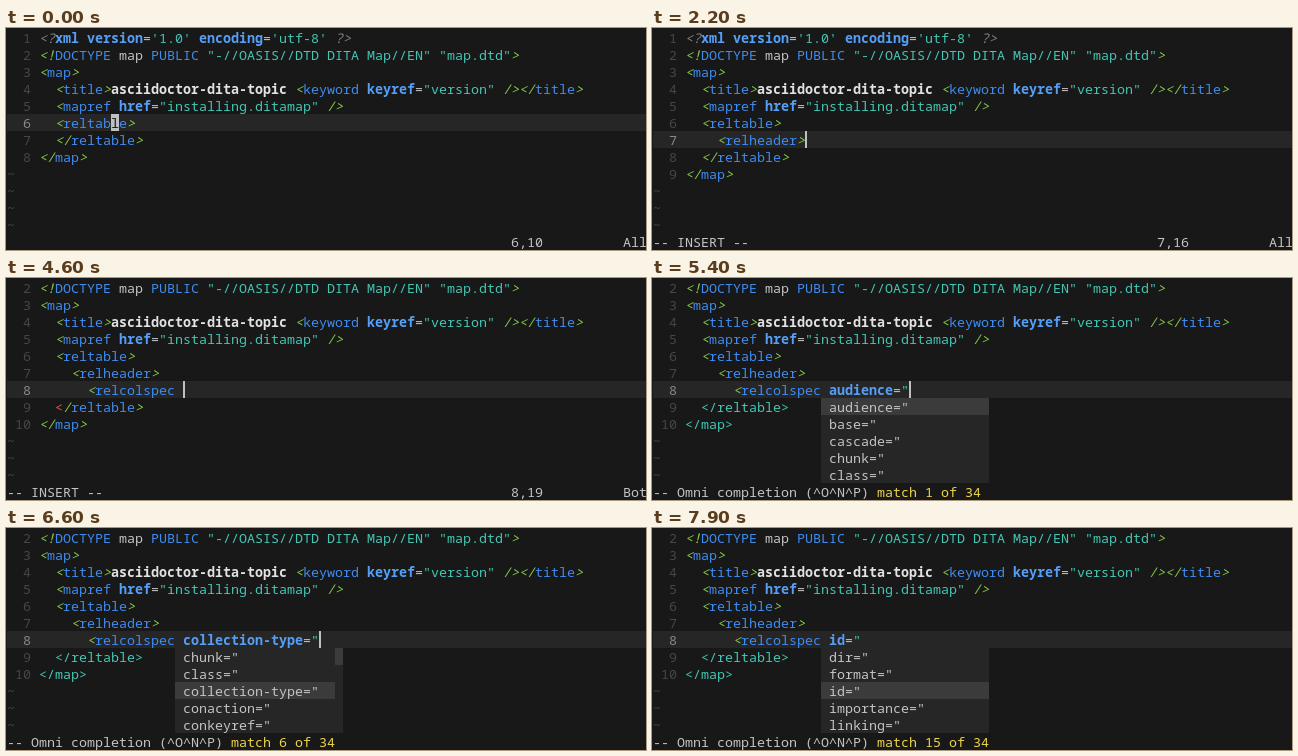
Write an HTML page that moves like this. It is 640 px wide and 222 px high and loops after 8000 ms.

```html
<!DOCTYPE html>
<html lang="en">
<head>
<meta charset="utf-8">
<title>Editor completion</title>
<style>
html, body { margin: 0; width: 100%; height: 100%; overflow: hidden; background: #181818; }
svg { display: block; width: 640px; height: 222px; }
text { font: 13.3333px "Noto Sans Mono", "DejaVu Sans Mono", monospace; white-space: pre; }
.n { fill: #c4c4c4; }
.g { fill: #87c84a; font-style: italic; }
.b { fill: #3f8cf0; }
.a { fill: #559ff8; font-weight: bold; }
.s { fill: #43c6b4; }
.t { fill: #e2e2e2; font-weight: bold; }
.c { fill: #808080; font-style: italic; }
.r { fill: #f0523f; }
.y { fill: #ecd548; }
.l { fill: #464646; }
.h { fill: #828a8c; }
.k { fill: #181818; }
</style>
</head>
<body>
<svg id="screen" viewBox="0 0 640 222"></svg>
<script>
const CW = 8, RH = 17, BASE = 14, ROWS = 12, LOOP = 8000;
const screen = document.getElementById('screen');

// Each token is one class letter followed by its text.
const head = [
  ['c<?', 'axml version', 'n=', "s'1.0'", 'a encoding', 'n=', "s'utf-8'", 'n ', 'c?>'],
  ['g<!', 'bDOCTYPE', 'n map ', 'bPUBLIC', 'n ', 's"-//OASIS//DTD DITA Map//EN"', 'n ', 's"map.dtd"', 'g>'],
  ['g<', 'bmap', 'g>'],
  ['n  ', 'g<', 'btitle', 'g>', 'tasciidoctor-dita-topic', 'n ', 'g<', 'bkeyword', 'n ',
    'akeyref', 'n=', 's"version"', 'n ', 'g/></', 'btitle', 'g>'],
  ['n  ', 'g<', 'bmapref', 'n ', 'ahref', 'n=', 's"installing.ditamap"', 'n ', 'g/>'],
  ['n  ', 'g<', 'breltable', 'g>']
];

const elements = ['relheader', 'relrow', 'title', 'topicmeta'];
const columns = ['relcolspec'];
const attrs = ('audience base cascade chunk class collection-type conaction conkeyref conref ' +
  'conrefend copy-to deliveryTarget dir format id importance linking locktitle').split(' ').map(a => a + '="');
const ATTR_TOTAL = 34;

const INSERT = '-- INSERT --', OMNI = '-- Omni completion (^O^N^P)';

// Completion steps: time and selected attribute.
const picks = [[5400, 1], [6100, 2], [6200, 3], [6300, 4], [6400, 5], [6600, 6], [6700, 7], [6900, 8],
  [7000, 9], [7100, 10], [7400, 11], [7500, 12], [7600, 13], [7800, 14], [7900, 15]];

const states = [
  { t: 0, line: 6, msg: '', ruler: true },
  { t: 200, line: 7, pad: 2, text: '', msg: INSERT, ruler: true },
  { t: 500, line: 7, pad: 4, text: '', msg: INSERT, ruler: true },
  { t: 900, line: 7, pad: 4, text: '<', msg: INSERT, ruler: true },
  { t: 1200, line: 7, pad: 4, text: '<', msg: OMNI },
  { t: 1400, line: 7, pad: 4, text: '<relheader', msg: OMNI,
    menu: { items: elements, sel: 1, total: 4, col: 8, width: 16 } },
  { t: 2100, line: 7, pad: 4, text: '<relheader>', msg: '' },
  { t: 2200, line: 7, pad: 4, text: '<relheader>', msg: INSERT, ruler: true },
  { t: 2500, line: 8, pad: 4, text: '', msg: INSERT, ruler: true },
  { t: 2900, line: 8, pad: 5, text: '', msg: INSERT, ruler: true },
  { t: 3000, line: 8, pad: 6, text: '', msg: INSERT, ruler: true },
  { t: 3200, line: 8, pad: 6, text: '<', msg: INSERT, ruler: true },
  { t: 3700, line: 8, pad: 6, text: '<', msg: OMNI },
  { t: 4000, line: 8, pad: 6, text: '<relcolspec', msg: OMNI,
    menu: { items: columns, sel: 1, total: 1, col: 10, width: 16 } },
  { t: 4600, line: 8, pad: 6, text: '<relcolspec ', msg: INSERT, ruler: true },
  { t: 5100, line: 8, pad: 6, text: '<relcolspec ', msg: OMNI },
  ...picks.map(([t, sel]) => ({
    t, line: 8, pad: 6, text: '<relcolspec ' + attrs[sel - 1], msg: OMNI, noCursor: sel === 15,
    menu: { items: attrs, sel, total: ATTR_TOTAL, col: 21, width: 20 }
  }))
];

function add(name, props, text) {
  const el = document.createElementNS('http://www.w3.org/2000/svg', name);
  for (const k in props) el.setAttribute(k, props[k]);
  if (text) el.textContent = text;
  screen.append(el);
}

const px = col => 1 + col * CW;
const py = row => 1 + row * RH;
const box = (x, row, width, fill) => add('rect', { x, y: py(row), width, height: RH, fill });

function put(col, row, cls, str) {
  if (str.trim()) add('text', { x: px(col), y: py(row) + BASE, class: cls }, str);
}

function putLine(col, row, tokens) {
  for (const token of tokens) {
    const str = token.slice(1), lead = str.length - str.trimStart().length;
    put(col + lead, row, token[0], str.trim());
    col += str.length;
  }
}

function typed(pad, text) {
  const out = ['n' + ' '.repeat(pad)];
  if (text === '<') return [...out, 'r<'];
  const m = text.match(/^<(\w+)(>?)( ?)([\w-]*)(=?)("?)$/);
  return m ? [...out, 'g<', 'b' + m[1], 'g' + m[2], 'n' + m[3], 'a' + m[4], 'n' + m[5], 's' + m[6]] : out;
}

function tail(text = '') {
  if (text.includes('"')) return [['n  ', 's</reltable>'], ['s</map>']];
  const open = /^<\w+ ?$/.test(text);
  return [['n  ', open ? 'r<' : 'g<', 'g/', 'breltable', 'g>'], ['g</', 'bmap', 'g>']];
}

function drawMenu({ items, sel, total, col, width }, row) {
  const shown = Math.min(5, total), first = Math.max(0, Math.min(sel - 3, total - shown));
  const scrolls = total > shown, end = px(col + width);
  for (let i = 0; i < shown; i++) {
    const on = first + i === sel - 1;
    box(px(col), row + i, width * CW, on ? '#3b3b3b' : '#262626');
    put(col + 1, row + i, 'n', items[first + i]);
    if (scrolls) box(end, row + i, CW, '#262626');
  }
  if (scrolls) {
    const span = total - shown;
    const thumb = Math.floor((first * (shown - 1) + (span >> 1)) / span);
    box(end, row + thumb, CW, '#3b3b3b');
  }
  put(OMNI.length + 1, ROWS, 'y', total === 1 ? 'The only match' : `match ${sel} of ${total}`);
}

function draw(s) {
  screen.replaceChildren();
  const top = s.line === 8 ? 1 : 0, row = s.line - 1 - top;
  const lines = [...head];
  if (s.line === 8) lines.push(typed(4, '<relheader>'));
  if (s.line > 6) lines.push(typed(s.pad, s.text));
  lines.push(...tail(s.text));

  box(px(0), row, 640, '#262626');
  for (let r = 0; r < ROWS; r++) {
    const line = lines[r + top];
    if (!line) { put(0, r, 'l', '~'); continue; }
    const num = String(r + top + 1);
    put(3 - num.length, r, r === row ? 'h' : 'l', num);
    putLine(4, r, line);
  }

  let col = 10;
  if (s.line === 6) {
    box(px(13), row, CW, '#c0c0c0');
    put(13, row, 'k', 'l');
  } else {
    col = s.pad + s.text.length + 1;
    if (!s.noCursor) box(px(col + 3), row, 2, '#c0c0c0');
  }

  put(0, ROWS, 'n', s.msg);
  if (s.ruler) {
    put(63, ROWS, 'n', `${s.line},${col}`);
    put(77, ROWS, 'n', top ? 'Bot' : 'All');
  }
  // The popup covers the lines below the cursor.
  if (s.menu) drawMenu(s.menu, row + 1);
}

let current;
function tick() {
  const t = performance.now() % LOOP;
  const next = states.findLast(s => s.t <= t);
  if (next !== current) draw(current = next);
  requestAnimationFrame(tick);
}
tick();
</script>
</body>
</html>
```
